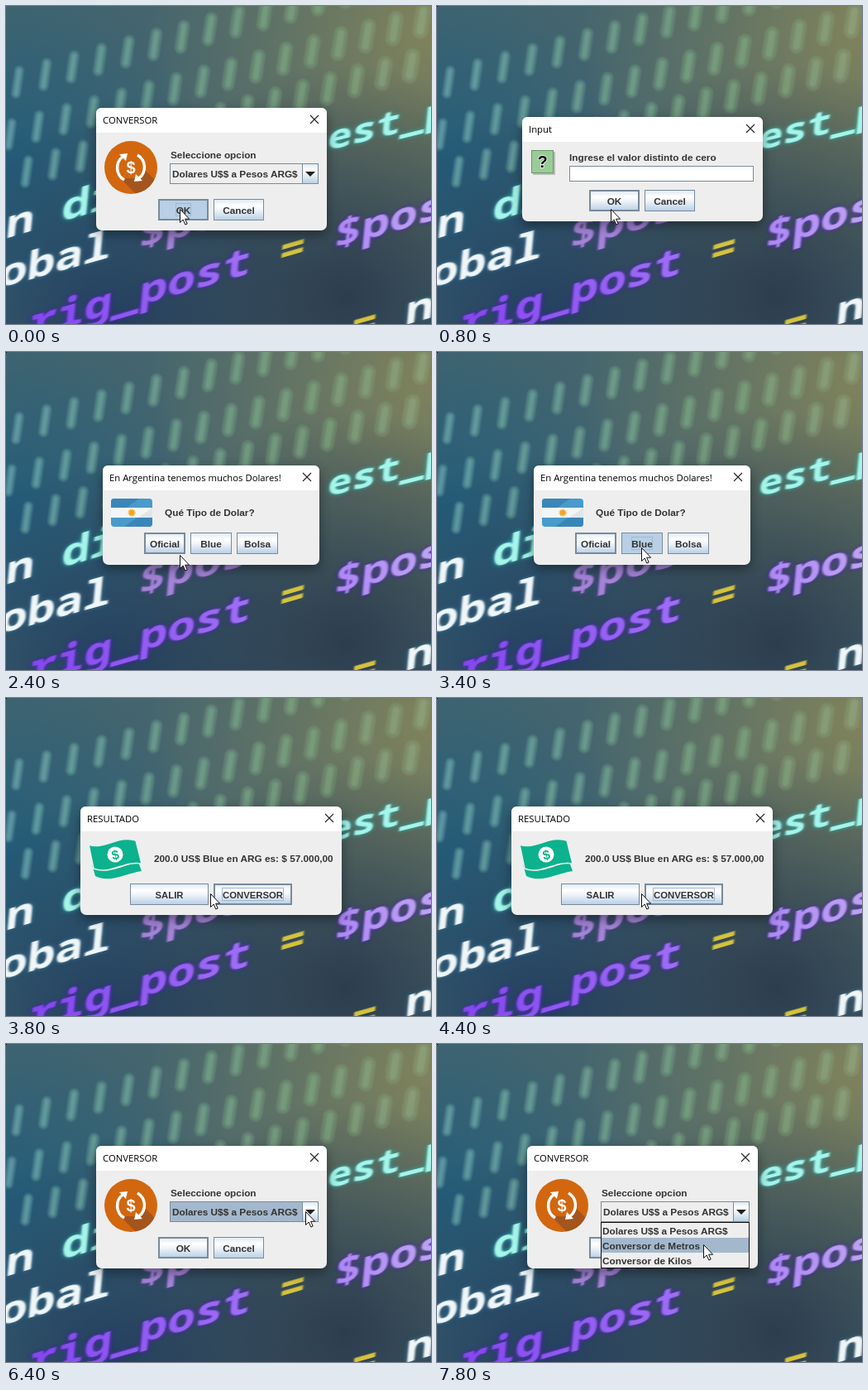
These frames come from a looping animation (514 by 384 pixels, 8 s). An HTML page:

```html
<!DOCTYPE html>
<html lang="es">
<head>
<meta charset="utf-8">
<title>Conversor</title>
<style>
html, body { margin: 0; width: 100%; height: 100%; overflow: hidden; background: #45606a; }
svg { display: block; width: 514px; height: 384px; }
text { white-space: pre; }
.ui { font: bold 11.8px "Liberation Sans", Arial, sans-serif; fill: #333; }
.caps { font-size: 11.3px; }
.mid { text-anchor: middle; }
.plain { font-weight: normal; font-size: 12px; }
.title { font: 11.3px "Open Sans", "Noto Sans", sans-serif; fill: #000; }
.code { font: 600 56px "Noto Sans Mono", "DejaVu Sans Mono", monospace; }
.window { filter: drop-shadow(0 5px 7px rgba(0, 0, 0, .4)); }
.white { fill: #eef6f8; filter: url(#glowBlue); }
.cyan { fill: #a4f5ea; filter: url(#glowCyan); }
.purple { fill: url(#violet); filter: url(#glowViolet); }
.lilac { fill: #a384d6; filter: url(#glowLilac); }
.yellow { fill: #d5c23c; filter: url(#soft); }

.t { animation: 8s -10ms step-end infinite; }
.corner { animation-name: corner; }
.choose { animation-name: choose; }
.chooseDown { animation-name: chooseDown; }
.comboFocus { animation-name: comboFocus; }
.popup { animation-name: popup; }
.firstRow { animation-name: firstRow; }
.secondRow { animation-name: secondRow; }
.input { animation-name: input; }
.inputDown { animation-name: inputDown; }
.key1 { animation-name: key1; }
.key2 { animation-name: key2; }
.key3 { animation-name: key3; }
.kind { animation-name: kind; }
.kindDown { animation-name: kindDown; }
.result { animation-name: result; }
.resultDown { animation-name: resultDown; }
.pointer { animation-name: pointer; }

@keyframes corner { 0% { opacity: 0 } 2.5%, 100% { opacity: 1 } }
@keyframes choose { 0%, 70%, 100% { opacity: 1 } 10% { opacity: 0 } }
@keyframes chooseDown { 0% { opacity: 1 } 10%, 100% { opacity: 0 } }
@keyframes comboFocus { 0%, 82.5%, 100% { opacity: 0 } 70% { opacity: 1 } }
@keyframes popup { 0% { opacity: 0 } 82.5%, 100% { opacity: 1 } }
@keyframes firstRow { 0%, 82.5% { opacity: 1 } 92.5%, 100% { opacity: 0 } }
@keyframes secondRow { 0% { opacity: 0 } 92.5%, 100% { opacity: 1 } }
@keyframes input { 0%, 27.5%, 100% { opacity: 0 } 10% { opacity: 1 } }
@keyframes inputDown { 0%, 27.5%, 100% { opacity: 0 } 25% { opacity: 1 } }
@keyframes key1 { 0% { fill: transparent } 15%, 100% { fill: #333 } }
@keyframes key2 { 0% { fill: transparent } 17.5%, 100% { fill: #333 } }
@keyframes key3 { 0% { fill: transparent } 20%, 100% { fill: #333 } }
@keyframes kind { 0%, 45%, 100% { opacity: 0 } 27.5% { opacity: 1 } }
@keyframes kindDown { 0%, 45%, 100% { opacity: 0 } 42.5% { opacity: 1 } }
@keyframes result { 0%, 70%, 100% { opacity: 0 } 45% { opacity: 1 } }
@keyframes resultDown { 0%, 70%, 100% { opacity: 0 } 67.5% { opacity: 1 } }
@keyframes pointer {
  0%, 30% { transform: translate(210px, 245px) }
  32.5% { transform: translate(221px, 241px) }
  35% { transform: translate(240px, 237px) }
  37.5%, 57.5% { transform: translate(247px, 236px) }
  60% { transform: translate(260px, 236px) }
  62.5% { transform: translate(282px, 235px) }
  65%, 70% { transform: translate(295px, 234px) }
  72.5% { transform: translate(311px, 226px) }
  75% { transform: translate(341px, 211px) }
  77.5%, 85% { transform: translate(362px, 202px) }
  87.5% { transform: translate(358px, 212px) }
  90% { transform: translate(346px, 227px) }
  92.5% { transform: translate(332px, 238px) }
  95%, 100% { transform: translate(322px, 242px) }
}
</style>
</head>
<body>
<svg id="stage" viewBox="0 0 514 384"></svg>
<script>
const linear = (id, stops, attrs) => `<linearGradient id="${id}" ${attrs}>` +
  stops.map(([at, color]) => `<stop offset="${at}" stop-color="${color}"/>`).join('') + '</linearGradient>';

const glow = (id, color, size) => `<filter id="${id}" x="-20%" y="-20%" width="140%" height="140%">
  <feGaussianBlur in="SourceGraphic" stdDeviation=".9" result="sharp"/>
  <feDropShadow in="sharp" dx="0" dy="0" stdDeviation="${size}" flood-color="${color}"/></filter>`;

const spot = (id, x, y, r, color, alpha) => `
  <radialGradient id="${id}" gradientUnits="userSpaceOnUse" cx="${x}" cy="${y}" r="${r}">
    <stop offset="0" stop-color="${color}" stop-opacity="${alpha}"/>
    <stop offset="1" stop-color="${color}" stop-opacity="0"/>
  </radialGradient>`;

const defs = `<defs>
  ${linear('metal', [[0, '#dde8f3'], [.3, '#fff'], [.5, '#f1f5fa'], [1, '#b8cfe5']], 'x2="0" y2="1"')}
  ${linear('violet', [[0, '#8446ee'], [.55, '#a070f5'], [1, '#c0a6f2']],
    'gradientUnits="userSpaceOnUse" x1="0" x2="500" y2="0"')}
  ${spot('olive', 514, 30, 340, '#83845a', .95)}
  ${spot('blue', 0, 190, 240, '#1d5c7c', .85)}
  ${spot('dark', 410, 350, 280, '#2a394b', .9)}
  ${spot('navy', 130, 390, 270, '#213c5e', .95)}
  ${glow('glowBlue', '#347a9c', 3)}
  ${glow('glowCyan', '#22b4b0', 3)}
  ${glow('glowViolet', '#5a1fd0', 3)}
  ${glow('glowLilac', '#5a3c92', 3)}
  <filter id="soft"><feGaussianBlur stdDeviation=".9"/></filter>
  <clipPath id="disc"><circle cx="151" cy="195" r="32"/></clipPath>
  <clipPath id="flag"><rect x="127" y="177" width="50" height="34" rx="4"/></clipPath>
</defs>`;

// Out-of-focus rows of slanted strokes, wider towards the right
function strokes() {
  const rows = [{ x: 14, y: 92 }, { x: 5, y: 155 }, { x: 25, y: 200 }];
  let out = '';
  for (const row of rows) {
    for (let x = row.x; x < 514; x += 33.2) {
      const y = row.y - .275 * (x - row.x), k = x / 514, half = 14 - 2 * k;
      const color = `hsl(${185 - 85 * k} ${30 - 12 * k}% ${58 + 2 * k}%)`;
      const path = `M${x - 2} ${y + half}L${x + 2} ${y - half}`;
      out += `<path d="${path}" stroke="${color}" stroke-width="${11 + 8 * k}" opacity="${.4 - .1 * k}"/>
        <path d="${path}" stroke="${color}" stroke-width="${5 + 4 * k}" opacity=".5"/>`;
    }
  }
  return `<g stroke-linecap="round" filter="url(#soft)">${out}</g>`;
}

// Text on a tilted screen: lines climb while letters stay upright and low.
// Each part is [class, leading column, text].
const codeLine = (x, y, slope, size, parts) =>
  `<g class="code" transform="matrix(1 ${-slope} -.08 .82 ${x} ${y})" style="font-size:${size}px">` +
  parts.map(([cls, col, s]) => `<text class="${cls}" x="${col * size * .6}">${s}</text>`).join('') + '</g>';

const background = `<rect width="514" height="384" fill="#45656e"/>` +
  ['olive', 'blue', 'navy', 'dark'].map(id => `<rect width="514" height="384" fill="url(#${id})"/>`).join('') +
  strokes() +
  codeLine(388, 175, .25, 49, [['cyan', 0, 'est_p']]) +
  codeLine(-1, 281, .3, 56, [['white', 0, 'n'], ['cyan', 2, 'di']]) +
  codeLine(-9, 341, .28, 56, [['white', 0, 'obal'], ['lilac', 5, '$post']]) +
  codeLine(26, 401, .29, 56, [['purple', 0, 'rig_post'], ['yellow', 9, '='], ['purple', 11, '$pos']]) +
  codeLine(415, 404, .28, 56, [['yellow', 0, '='], ['white', 2, 'n']]);

const box = (x, y, w, h, attrs) =>
  `<rect x="${x + .5}" y="${y + .5}" width="${w - 1}" height="${h - 1}" ${attrs}/>`;

const label = (x, y, s, cls = '') => `<text class="ui ${cls}" x="${x}" y="${y}">${s}</text>`;

function button(x, y, w, s, { strong, focus, down, textWidth = 19, caps } = {}) {
  const ring = box(x + (w - textWidth) / 2, y + 5, textWidth, 16, 'fill="none" stroke="#a3b8cc"');
  const frame = fill => strong
    ? `<rect x="${x + 1}" y="${y + 1}" width="${w - 2}" height="24" fill="${fill}" stroke="#7a8a99" stroke-width="2"/>`
    : box(x, y, w, 26, `fill="${fill}" stroke="#7a8a99"`);
  return frame('url(#metal)') + (focus ? ring : '') +
    (down ? `<g class="t ${down}">${frame('#b8cfe5')}${ring}</g>` : '') +
    label(x + w / 2, y + 17.5, s, 'mid ' + (caps ? 'caps' : ''));
}

const dialog = (name, x, y, w, h, title, content) => `<g class="t ${name}">
  <g class="window"><rect x="${x}" y="${y}" width="${w}" height="${h}" rx="7" fill="#eee"/></g>
  <path d="M${x} ${y + 30}v-23q0-7 7-7h${w - 14}q7 0 7 7v23z" fill="#fff"/>
  <text class="title" x="${x + 8}" y="${y + 18.5}">${title}</text>
  <path d="M${x + w - 20} ${y + 9}l10 10m0-10l-10 10" stroke="#222" stroke-width="1.1"/>
  ${content}</g>`;

const exchangeIcon = `<circle cx="151" cy="195" r="32" fill="#d2670f"/>
  <path d="M138 208l30 30 20-20-20-20-7 10z" fill="#a4551d" clip-path="url(#disc)"/>
  <g fill="none" stroke="#fff" stroke-width="3.5">
    <path d="M143 210A17 17 0 0 1 141 182"/><path d="M159 180A17 17 0 0 1 161 208"/>
  </g>
  <path d="M137 179l10-1-2 9zM165 211l-10 1 2-9z" fill="#fff"/>
  <text class="ui mid" x="151" y="202" style="font-size:20px;fill:#fff">$</text>`;

const questionIcon = `<rect x="116" y="176" width="27" height="28" fill="#bbb"/>
  ${box(114, 174, 27, 28, 'fill="#99cc99" stroke="#669966"')}
  <text class="ui mid" x="127.5" y="195" style="font-size:20px;fill:#000;stroke:#fff;stroke-width:1.5;paint-order:stroke">?</text>`;

const flagIcon = `<g clip-path="url(#flag)">
  <rect x="127" y="177" width="50" height="34" fill="#4a9acb"/>
  <path d="M127 177h34l-34 24zM177 187v24h-34z" fill="#3a86b8"/>
  <rect x="127" y="188" width="50" height="12" fill="#f3f6f8"/>
  <path d="M177 188v12h-17z" fill="#dfe6eb"/></g>
  <circle cx="152" cy="194" r="3.6" fill="#f4a51c"/>
  <circle cx="152" cy="194" r="4.2" fill="none" stroke="#f4a51c" stroke-dasharray="1.4 1.4"/>`;

const moneyIcon = `<g fill="#0bb28d">
  <path d="M104 201C118 217 138 203 160 198L164 209C143 212 126 224 108 215Z"/>
  <path d="M100 177C118 184 136 165 157 172L164 200C143 196 126 214 106 206Z" stroke="#eee" stroke-width="1.5"/></g>
  <circle cx="132" cy="189" r="9.5" fill="#fff"/>
  <text class="ui mid" x="132" y="195" transform="rotate(-12 132 189)" style="font-size:16px;fill:#0bb28d">$</text>`;

const option = 'Dolares U$$ a Pesos ARG$';

const chooser = exchangeIcon + label(199, 184, 'Seleccione opcion') +
  box(198, 190, 180, 25, 'fill="#eee" stroke="#7a8a99"') +
  '<rect class="t comboFocus" x="199" y="191" width="159" height="23" fill="#a3b8cc"/>' +
  box(358, 190, 20, 25, 'fill="url(#metal)" stroke="#7a8a99"') +
  '<path d="M362 200h12l-6 6z" fill="#222"/>' + label(201, 207, option) +
  button(184, 233, 61, 'OK', { strong: true, down: 'chooseDown' }) + button(251, 233, 61, 'Cancel') +
  `<g class="t popup">${box(198, 215, 180, 56, 'fill="#eee" stroke="#111"')}
    <rect class="t firstRow" x="199" y="216" width="178" height="18" fill="#a3b8cc"/>
    <rect class="t secondRow" x="199" y="234" width="178" height="18" fill="#a3b8cc"/>
    ${[option, 'Conversor de Metros', 'Conversor de Kilos'].map((s, i) => label(200, 230 + 18 * i, s)).join('')}</g>`;

const inputForm = questionIcon + label(160, 187, 'Ingrese el valor distinto de cero') +
  box(160, 193, 223, 19, 'fill="#fff" stroke="#7a8a99"') +
  label(162, 207.5, ['2', '0', '0'].map((d, i) => `<tspan class="t key${i + 1}">${d}</tspan>`).join(''), 'plain') +
  button(184, 222, 61, 'OK', { strong: true, down: 'inputDown' }) + button(251, 222, 61, 'Cancel');

const kindForm = flagIcon + label(192, 198, 'Qué Tipo de Dolar?') +
  button(167, 218, 50, 'Oficial', { strong: true }) +
  button(223, 218, 50, 'Blue', { down: 'kindDown', textWidth: 26 }) + button(279, 218, 50, 'Bolsa');

const resultForm = moneyIcon + label(179, 198, '200.0 US$ Blue en ARG es: $ 57.000,00') +
  button(150, 224, 95, 'SALIR', { caps: true }) +
  button(251, 224, 95, 'CONVERSOR', { strong: true, focus: true, down: 'resultDown', textWidth: 75, caps: true });

document.getElementById('stage').innerHTML = defs + background +
  dialog('choose', 109, 123, 279, 148, 'CONVERSOR', chooser) +
  dialog('input', 103, 134, 291, 126, 'Input', inputForm) +
  dialog('kind', 117, 137, 262, 120, 'En Argentina tenemos muchos Dolares!', kindForm) +
  dialog('result', 90, 131, 316, 131, 'RESULTADO', resultForm) +
  `<path class="t pointer" d="M.5 .5v16l3.7-3.5 2.6 6 2.4-1-2.6-5.8h5z" fill="#fff" stroke="#111"/>
  <rect class="t corner" width="1" height="1"/>`;
</script>
</body>
</html>
```
